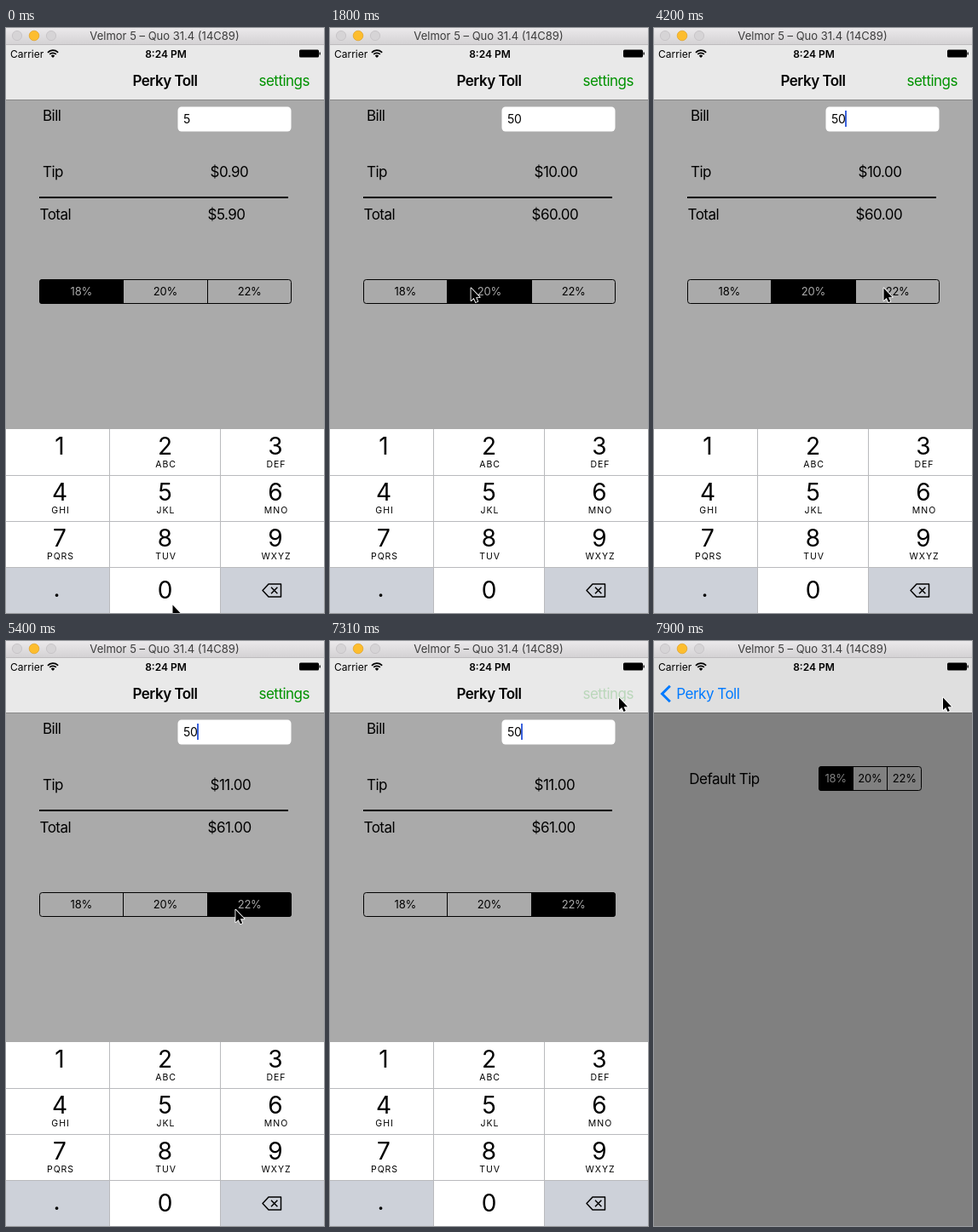
Animation, 373 px wide and 687 px high, one loop 8 s. Source, as an HTML page with a canvas:

```html
<!DOCTYPE html>
<html lang="en">
<head>
<meta charset="utf-8">
<title>Tip calculator</title>
<style>
html, body { margin: 0; width: 373px; height: 687px; overflow: hidden; background: #aaa; }
canvas { display: block; width: 373px; height: 687px; }
</style>
</head>
<body>
<canvas id="stage"></canvas>
<script>
const W = 373, H = 687, LOOP = 8000;
const APP = 'Perky Toll', DEVICE = 'Velmor 5 – Quo 31.4 (14C89)';
const GREEN = '#009200', BLUE = '#007aff';
const TYPED = 150, PICK_20 = 1650, PICK_22 = 4500, PRESSED = 7300, PUSHED = 7600, SETTLED = 7900;
const canvas = document.getElementById('stage');
const c = canvas.getContext('2d');
const dpr = window.devicePixelRatio || 1;
canvas.width = W * dpr;
canvas.height = H * dpr;

// The screen refreshes every 150 ms, a little faster in the last part.
function refresh(t) {
  const from = t < 5700 ? 0 : 5700;
  const step = from ? 2200 / 15 : 150;
  const lead = from ? 10 : 0;
  return from + Math.floor((t - from + lead) / step) * step;
}

// Pointer moves: each bends from the previous end past a control point.
const HOME = [195, 677];
const MOVES = [
  { from: 300, to: 1350, via: [14, 290], end: [165, 305] },
  { from: 2100, to: 2950, via: [217, 305], end: [269, 305] },
  { from: 5150, to: 5750, via: [288, 310], end: [205, 360] },
  { from: 5750, to: 6600, via: [219, 40], end: [338.5, 66] }
];

const clamp = v => Math.min(1, Math.max(0, v));
const ease = u => u * u * (3 - 2 * u);

function pointerAt(t) {
  let pos = HOME;
  for (const m of MOVES) {
    const s = ease(clamp((t - m.from) / (m.to - m.from))), r = 1 - s;
    pos = pos.map((p, i) => r * r * p + 2 * r * s * m.via[i] + s * s * m.end[i]);
  }
  return pos;
}

// One blink per second; typing keeps the caret lit.
function caretAlpha(t) {
  if (t >= TYPED && t < 450) return 1;
  const p = (t + 800) % 1000;
  return p < 700 ? clamp((550 - p) / 170) : clamp((p - 850) / 150);
}

function rect(x, y, w, h, fill) {
  c.fillStyle = fill;
  c.fillRect(x, y, w, h);
}

function round(x, y, w, h, r) {
  c.beginPath();
  c.roundRect(x, y, w, h, r);
}

function dot(x, y, r, fill, stroke) {
  c.beginPath();
  c.arc(x, y, r, 0, Math.PI * 2);
  c.fillStyle = fill;
  c.fill();
  c.strokeStyle = stroke;
  c.lineWidth = 0.8;
  c.stroke();
}

function line(points, width, color) {
  c.beginPath();
  points.forEach(p => c.lineTo(...p));
  c.lineWidth = width;
  c.strokeStyle = color;
  c.stroke();
}

function text(s, x, y, size = 17, { color = '#000', align = 'left', weight = 400, track = -0.03 } = {}) {
  c.font = `${weight} ${size}px Inter, Roboto, sans-serif`;
  c.letterSpacing = track * size + 'px';
  c.textAlign = align;
  c.fillStyle = color;
  c.fillText(s, x, y);
}

function titleBar() {
  const g = c.createLinearGradient(0, 0, 0, 20);
  g.addColorStop(0, '#ebe9eb');
  g.addColorStop(1, '#d3d1d3');
  rect(0, 0, W, 20, g);
  rect(0, 19, W, 1, '#bdbbbd');
  dot(13, 9, 5.6, '#d6d4d6', '#c3c1c3');
  dot(33, 9, 5.8, '#fdbd2e', '#e2a52c');
  dot(53, 9, 5.6, '#d6d4d6', '#c3c1c3');
  text(DEVICE, 186, 14, 13, { color: '#3c3c3c', align: 'center', track: 0 });
}

function statusBar() {
  text('Carrier', 5, 34.5, 12, { track: 0 });
  text('8:24 PM', 187.5, 34.5, 12, { align: 'center', weight: 600, track: 0 });
  c.strokeStyle = c.fillStyle = '#000';
  c.lineWidth = 1.7;
  for (const r of [5.2, 8.3]) {
    c.beginPath();
    c.arc(55, 34.5, r, -Math.PI * 0.76, -Math.PI * 0.24);
    c.stroke();
  }
  c.beginPath();
  c.moveTo(55, 35);
  c.arc(55, 34.5, 2.8, -Math.PI * 0.78, -Math.PI * 0.22);
  c.fill();
  round(344, 25.5, 23, 9, 1.5);
  c.fill();
  rect(367.5, 28.5, 1.3, 3, '#000');
}

function segments(x, y, w, h, picked, bg) {
  const edge = i => Math.floor(x + w / 3 * i);
  c.save();
  round(x, y, w, h, 3.5);
  c.clip();
  rect(edge(picked), y, edge(picked + 1) - edge(picked), h, '#000');
  c.restore();
  round(x + 0.5, y + 0.5, w - 1, h - 1, 3);
  c.strokeStyle = '#000';
  c.lineWidth = 1;
  c.stroke();
  ['18%', '20%', '22%'].forEach((s, i) => {
    if (i) rect(edge(i), y, 1, h, '#000');
    text(s, x + w / 3 * (i + 0.5), y + h / 2 + 4.7, 13,
      { align: 'center', color: i === picked ? bg : '#000', track: -0.015 });
  });
}

function keypad() {
  rect(0, 471, W, 216, '#fff');
  for (const x of [0, 252]) rect(x, 634, 121, 53, '#cdd1d9');
  for (const x of [121, 251]) rect(x, 471, 1, 216, '#b9babd');
  for (let row = 1; row < 4; row++) rect(0, 471 + 54 * row, W, 1, '#b9babd');
  const cols = [63, 186.5, 316];
  const key = (s, x, y) => text(s, x, y, 28, { align: 'center', track: 0 });
  ' ABC DEF GHI JKL MNO PQRS TUV WXYZ'.split(' ').forEach((s, i) => {
    const x = cols[i % 3], y = 501 + 54 * Math.floor(i / 3);
    key(i + 1, x, y);
    text(s, x + 1, y + 15, 10.5, { align: 'center', track: 0.09 });
  });
  key('0', 186.5, 670);
  key('.', 59.5, 668);
  c.lineJoin = 'round';
  line([[301, 660.5], [308, 653], [322.5, 653], [322.5, 668], [308, 668], [301, 660.5], [302, 659.5]], 1.5, '#000');
  line([[311, 656.8], [318.4, 664.2]], 1.5, '#000');
  line([[318.4, 656.8], [311, 664.2]], 1.5, '#000');
}

function navBar(fill) {
  rect(0, 20, W, 64, fill);
  rect(0, 84, W, 1, 'rgba(0,0,0,.2)');
}

function calculator(t) {
  const bill = t < TYPED ? 5 : 50;
  const picked = t < PICK_20 ? 0 : t < PICK_22 ? 1 : 2;
  const tip = bill * (0.18 + 0.02 * picked);
  const money = v => '$' + v.toFixed(2);
  rect(0, 84, W, 387, '#aaa');
  text('Bill', 43, 109);
  text('Tip', 43, 175);
  text('Total', 39.5, 224.5);
  text(money(tip), 239.5, 174.5);
  text(money(bill + tip), 236.5, 224.5);
  rect(39, 198, 292, 2, '#000');

  round(201.5, 92.5, 133, 29, 4.5);
  c.fillStyle = '#fff';
  c.fill();
  text(bill, 208, 112, 14, { track: -0.02 });
  c.globalAlpha = caretAlpha(t);
  rect(224, 97, 2, 19, '#3b62dc');
  c.globalAlpha = 1;

  segments(39, 295, 296, 29, picked, '#aaa');
  keypad();
  navBar('#e9e9e9');
  statusBar();
  text(APP, 186.5, 68, 17, { align: 'center', weight: 600 });
  c.globalAlpha = t < PRESSED ? 1 : 0.2;
  text('settings', 296.5, 68, 17, { color: GREEN });
  c.globalAlpha = 1;
}

function settings(t) {
  const left = clamp((SETTLED - t) / (SETTLED - PUSHED));
  const off = Math.round(14.5 * left * left);
  const edge = Math.max(0, off - 1);
  rect(0, 84, W, 603, '#808080');
  // Sliver of the calculator still in view
  rect(0, 84, edge, 387, '#a0a0a0');
  rect(0, 471, edge, 216, '#fff');
  rect(0, 198, edge, 2, '#000');
  for (const y of [295, 323]) rect(0, y, edge, 1, '#000');
  navBar('#dfdfdf');
  const g = c.createLinearGradient(edge - 9, 0, edge, 0);
  g.addColorStop(0, 'rgba(0,0,0,0)');
  g.addColorStop(1, 'rgba(0,0,0,.3)');
  rect(0, 20, edge, 667, g);

  text('Default Tip', 41.3 + off, 167.5);
  segments(193 + off, 147, 121, 29, 0, '#808080');
  statusBar();
  c.globalAlpha = 1 - off / 28;
  c.lineJoin = 'miter';
  line([[18.8, 52.8], [9.5, 62], [18.8, 71.2]], 3, BLUE);
  c.globalAlpha = 1;
  text(APP, 26.3 + off / 4, 68, 17, { color: BLUE });
}

function pointer(x, y) {
  c.save();
  c.translate(x, y);
  c.beginPath();
  [[0.5, 0.5], [0.5, 15], [3.7, 12], [6, 17], [8.3, 16], [6.1, 11.2], [10.6, 11.2]]
    .forEach(p => c.lineTo(...p));
  c.closePath();
  c.lineJoin = 'round';
  c.strokeStyle = '#fff';
  c.lineWidth = 1.8;
  c.stroke();
  c.fillStyle = '#000';
  c.fill();
  c.restore();
}

function draw(now) {
  const t = refresh(now % LOOP);
  c.setTransform(dpr, 0, 0, dpr, 0, 0);
  if (t < PUSHED) calculator(t);
  else settings(t);
  titleBar();
  pointer(...pointerAt(t));
}

const start = performance.now();
function tick() {
  draw(performance.now() - start);
  requestAnimationFrame(tick);
}
tick();
</script>
</body>
</html>
```
